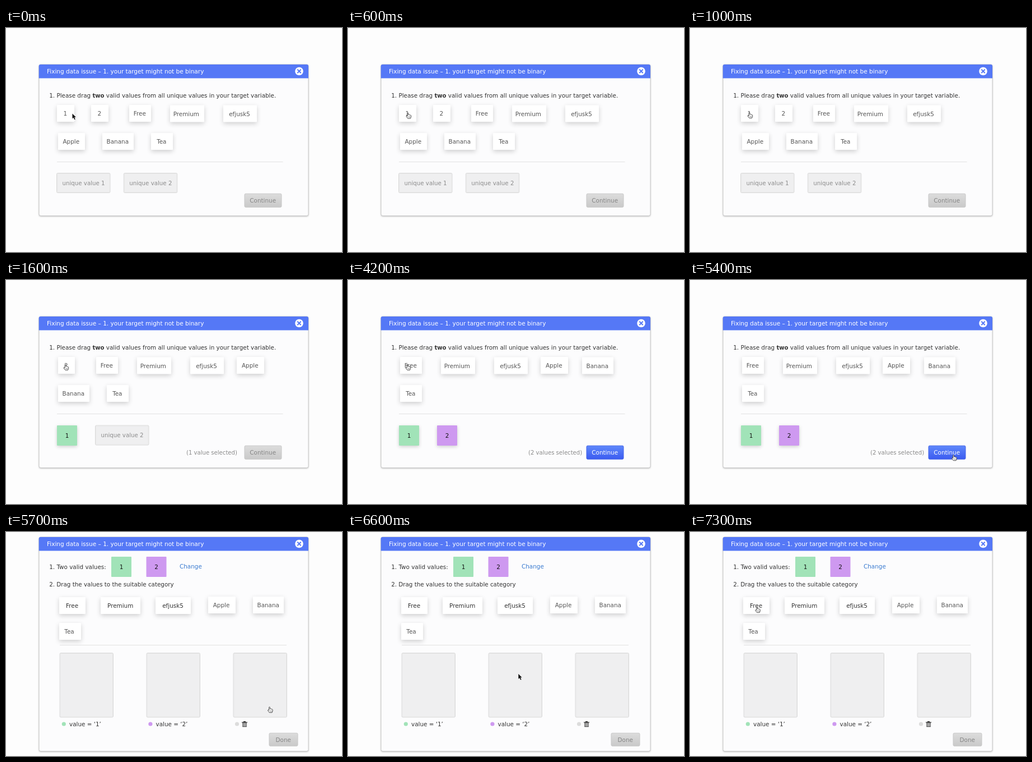
Write an HTML page with a canvas that moves like this. It is 600 px wide and 399 px high and loops after 8000 ms.

```html
<!DOCTYPE html>
<html lang="en">
<head>
<meta charset="utf-8">
<title>Fixing data issue</title>
<style>
  html, body { margin: 0; width: 600px; height: 399px; overflow: hidden; background: #fdfdfd; }
  canvas { display: block; }
</style>
</head>
<body>
<canvas id="stage" width="600" height="399"></canvas>
<script>
const ctx = document.getElementById('stage').getContext('2d');
const LOOP = 8000, STEP = 100;
const GREEN = '#a1e3b8', PURPLE = '#ce99f0', INK = '#333';

function text(str, x, y, color = INK, align = 'left', size = 10.4, weight = '') {
  ctx.font = `${weight} ${size}px "DejaVu Sans", sans-serif`;
  ctx.textAlign = align;
  ctx.fillStyle = color;
  ctx.fillText(str, x, y);
  return ctx.measureText(str).width;
}

function box(x, y, w, h, fill, { radius = 1, stroke, shadow } = {}) {
  ctx.save();
  if (shadow) [ctx.shadowColor, ctx.shadowBlur, ctx.shadowOffsetY] = shadow;
  ctx.beginPath();
  ctx.roundRect(x, y, w, h, radius);
  ctx.fillStyle = fill;
  ctx.fill();
  if (stroke) {
    ctx.shadowColor = 'transparent';
    ctx.strokeStyle = stroke;
    ctx.stroke();
  }
  ctx.restore();
}

function dot(x, y, r, color) {
  ctx.beginPath();
  ctx.arc(x, y, r, 0, 7);
  ctx.fillStyle = color;
  ctx.fill();
}

function dialog(y, h) {
  box(59, y, 481, h, '#fcfcfd', { radius: 3, stroke: '#c8c8c8', shadow: ['rgba(0,0,0,.3)', 3, 1] });
  box(58.7, y, 481.3, 24.5, '#5578f6', { radius: [3, 3, 0, 0] });
  text('Fixing data issue – 1. your target might not be binary', 73, y + 16, '#fff', 'left', 10.54);
  dot(523.5, y + 12, 7.3, '#fff');
  ctx.strokeStyle = '#5578f6';
  ctx.lineWidth = 2;
  ctx.beginPath();
  for (const s of [-1, 1]) {
    ctx.moveTo(520.3, y + 12 - 3.2 * s);
    ctx.lineTo(526.7, y + 12 + 3.2 * s);
  }
  ctx.stroke();
  ctx.lineWidth = 1;
}

function card(label, x, y, w, dx = -.7, color = '#555') {
  box(x, y, w, 30, '#fff', { shadow: ['rgba(0,0,0,.18)', 8, 3] });
  text(label, x + w / 2 + dx, y + 19, color, 'center');
}

function chip(label, x, y, color, raised) {
  box(x, y, 36, 36, color, { shadow: raised && ['rgba(0,0,0,.18)', 6, 2] });
  text(label, x + 18, y + 22, '#111', 'center');
}

function slot(x, y, w, h, label = '') {
  box(x, y, w, h, '#efeff0', { radius: 2, stroke: '#dadada' });
  box(x + 1, y + 1, w - 2, h - 2, 'transparent', { stroke: '#e8e8e8' });
  text(label, x + w / 2 + .3, y + 21, '#8c8c8c', 'center', 10.25);
}

function button(label, x, y, w, h, active) {
  const fill = ctx.createLinearGradient(0, y, 0, y + h);
  fill.addColorStop(0, active ? '#5f88fb' : '#dcdcdc');
  fill.addColorStop(1, active ? '#3b5bf0' : '#c9c9c9');
  box(x, y, w, h, fill, { radius: 2, stroke: active ? '#4867e8' : '#c8c8c8' });
  text(label, x + w / 2 - .3, y + 16, active ? '#fff' : '#858585', 'center');
}

function divider(x, y, w) {
  ctx.fillStyle = '#e2e2e2';
  ctx.fillRect(x, y, w, 1);
}

function trash(x, y) {
  ctx.fillStyle = ctx.strokeStyle = INK;
  ctx.fillRect(x, y + 1.5, 10, 1.2);
  ctx.strokeRect(x + 3.5, y + .5, 3, 1.5);
  ctx.strokeRect(x + 1.8, y + 3, 6.4, 6.7);
  for (const dx of [3.3, 5.6]) ctx.fillRect(x + dx, y + 4, 1, 5);
}

// Cards per selection count: [label, x, y, width, label shift]
const pickCards = [
  [['1', 91, 137, 31], ['2', 152, 137, 31], ['Free', 220, 137, 39], ['Premium', 293, 137.5, 61, -1.7],
   ['efjusk5', 388, 137.5, 60, -1], ['Apple', 93, 187, 48], ['Banana', 172, 187, 56], ['Tea', 259, 187, 39]],
  [['2', 93, 137, 30], ['Free', 161, 137, 39], ['Premium', 234, 137.5, 61, -1.7], ['efjusk5', 329, 137.5, 60, -1],
   ['Apple', 412, 137, 49], ['Banana', 93, 187, 56], ['Tea', 180, 187, 39]],
  [['Free', 93, 137, 39], ['Premium', 166, 137.5, 61, -1.7], ['efjusk5', 261, 137.5, 60, -1],
   ['Apple', 344, 137, 49], ['Banana', 418, 137.5, 56], ['Tea', 93, 187, 39]],
];

function pickScreen(count) {
  dialog(65, 269.5);
  let x = 77.2;
  x += text('1. Please drag ', x, 123.7, INK, 'left', 10.38);
  x += text('two', x, 123.7, INK, 'left', 10.1, 'bold');
  text(' valid values from all unique values in your target variable.', x, 123.7, INK, 'left', 10.38);
  pickCards[count].forEach(c => card(...c));
  divider(91, 238, 403.5);
  if (count) chip('1', 91, 259, GREEN, true);
  else slot(90.5, 258.5, 95.5, 35, 'unique value 1');
  if (count > 1) chip('2', 159, 259, PURPLE, true);
  else slot(count ? 159.5 : 210.3, count ? 259 : 258.5, 95.5, 35, 'unique value 2');
  if (count) text(`(${count} value${count > 1 ? 's' : ''} selected)`, 322, 311, '#8a8a8a', 'left', 10.1);
  button('Continue', 426, 295.2, 66, 24, count > 1);
}

function sortScreen() {
  dialog(9, 381.5);
  text('1. Two valid values:', 77.2, 66, INK, 'left', 10.4);
  chip('1', 188, 44, GREEN);
  chip('2', 250.5, 44, PURPLE);
  text('Change', 310, 65, '#3a7bd0');
  text('2. Drag the values to the suitable category', 77.2, 97, INK, 'left', 10.34);
  card('Free', 95, 116, 47, -.5, INK);
  card('Premium', 169, 116, 71, -.3, INK);
  card('efjusk5', 267, 116, 63, -.5, INK);
  card('Apple', 361, 115, 49, -1);
  card('Banana', 441, 115, 55, -.3);
  card('Tea', 95, 162, 39, -1.5);
  divider(96, 201, 405);
  [GREEN, PURPLE, '#dcdcdc'].forEach((color, i) => {
    const x = 96 + 155 * i;
    slot(x, 215.5, 95.5, 114.5);
    dot(x + 7.3 - i * .4, 342, 3.6, color);
    if (i < 2) text(`value = ‘${i + 1}’`, x + 17 - i * .5, 346);
  });
  trash(421, 337);
  button('Done', 470, 358.2, 51, 23);
}

// Pointer tip: [time, x, y]
const path = [
  [0, 118.5, 152.5], [200, 108, 152], [500, 108, 152], [600, 107, 151], [800, 107, 151],
  [1000, 106, 150.3], [4600, 106, 150.3], [4800, 486, 369], [4900, 486, 369], [5400, 470.5, 311.5],
  [6200, 470.5, 311.5], [6700, 285, 246], [6800, 285, 246], [7300, 119.7, 133.3], [LOOP, 119.7, 133.3],
];
const handTimes = [[600, 4700], [5200, 5800], [7200, LOOP]];
const arrowShape = new Path2D('M0 0V9L2.1 7.1 3.7 10.8 5.3 10.1 3.7 6.5H6.4Z');
const handShape = new Path2D('M-1 1C-1-.2 1-.2 1 1V4.2C1.5 3.5 2.7 3.6 2.9 4.5 3.4 3.9 4.6 4.1 4.7 5 5.4 4.5 6.4 5 6.4 6V8.3L5.2 11.5H-.2L-3.2 7.6C-3.9 6.5-2.5 5.5-1.6 6.5L-1 7.1Z');

function pointer(t) {
  const i = path.findIndex(p => p[0] > t);
  const [t0, x0, y0] = path[i - 1], [t1, x1, y1] = path[i];
  const u = (t - t0) / (t1 - t0), k = u * u * (3 - 2 * u);
  const hand = handTimes.some(([a, b]) => t >= a && t < b);
  ctx.save();
  ctx.translate(x0 + (x1 - x0) * k, y0 + (y1 - y0) * k);
  const shape = hand ? handShape : arrowShape;
  ctx.strokeStyle = hand ? INK : '#fff';
  ctx.fillStyle = hand ? '#fff' : '#111';
  ctx.lineJoin = 'round';
  if (hand) {
    ctx.scale(.88, .88);
    ctx.fill(shape);
    ctx.stroke(shape);
    ctx.fillStyle = '#666';
    for (const x of [.7, 2.4, 4.1]) ctx.fillRect(x, 7.2, .7, 2.6);
  } else {
    ctx.stroke(shape);
    ctx.fill(shape);
  }
  ctx.restore();
}

function draw(now) {
  const t = Math.floor(now % LOOP / STEP) * STEP;
  ctx.fillStyle = '#fdfdfd';
  ctx.fillRect(0, 0, 600, 399);
  if (t < 5700) pickScreen(t < 1600 ? 0 : t < 4200 ? 1 : 2);
  else sortScreen();
  pointer(t);
}

const start = performance.now();
function frame() {
  draw(performance.now() - start);
  requestAnimationFrame(frame);
}
frame();
</script>
</body>
</html>
```
